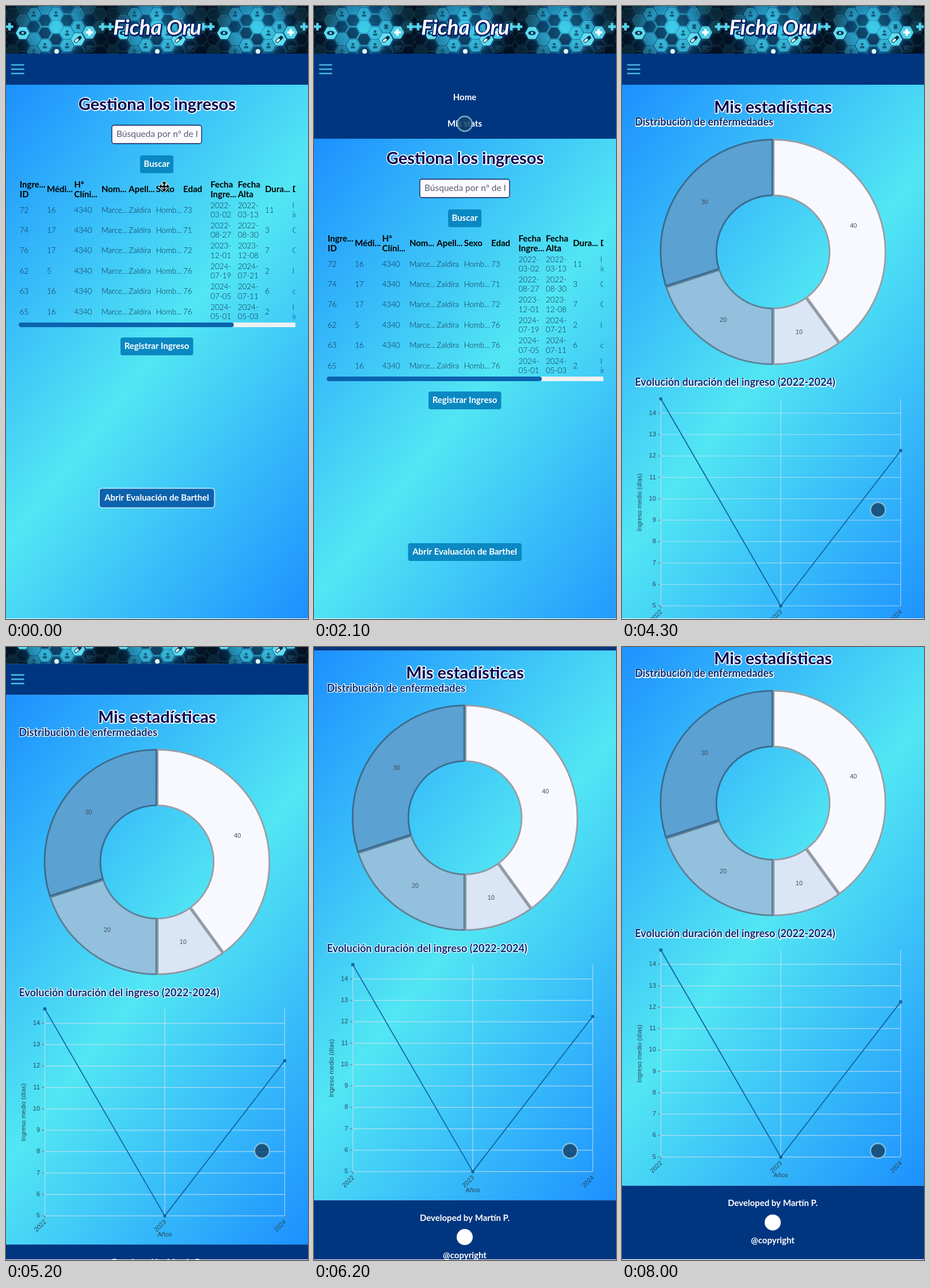
Recreate the animation shown at these times as an HTML page with a canvas. Size 525 by 1067 pixels, loop 8100 ms.

```html
<!DOCTYPE html>
<html lang="es">
<head>
<meta charset="utf-8">
<title>Panel de ingresos</title>
<style>
  html, body { margin: 0; width: 100%; height: 100%; overflow: hidden; background: #fff; }
  canvas { display: block; width: 525px; height: 1067px; }
</style>
</head>
<body>
<canvas id="stage" width="525" height="1067"></canvas>
<script>
const W = 525, H = 1067, LOOP = 8100, STEP = 100;
const ctx = document.getElementById('stage').getContext('2d');
const SANS = 'Lato, "Open Sans", sans-serif';
const CHART = '"Liberation Sans", Arial, sans-serif';
const NAVY = '#003680', BUTTON = '#0a88c2', ACTIVE = '#0b63ae';

// Times of the hard changes and of the scroll, in ms
const T = { touch: 200, menu: 1000, tapEnd: 1600, stats: 2300, charts: 3600, scroll: 4500, brake: 6300, rest: 6700 };

const lerp = (a, b, k) => a + (b - a) * k;
const clamp01 = v => Math.max(0, Math.min(1, v));
const smooth = k => k * k * (3 - 2 * k);

function text(str, x, y, size, o = {}) {
  ctx.font = `${o.style || ''} ${o.weight || 400} ${size}px ${o.family || SANS}`;
  ctx.textAlign = o.align || 'left';
  ctx.textBaseline = 'middle';
  if (o.halo) {
    ctx.lineJoin = 'round';
    ctx.lineWidth = o.haloWidth || 3;
    ctx.strokeStyle = o.halo;
    ctx.strokeText(str, x + 0.5, y + 0.5);
  }
  ctx.fillStyle = o.color || '#000';
  ctx.fillText(str, x, y);
}

const label = (str, x, y, color = '#fff') => text(str, x, y, 15, { weight: 700, align: 'center', color });

function rect(x, y, w, h, color) {
  ctx.fillStyle = color;
  ctx.fillRect(x, y, w, h);
}

function box(x, y, w, h, r, fill, stroke, line = 1.3) {
  ctx.beginPath();
  ctx.roundRect(x, y, w, h, r);
  ctx.fillStyle = fill;
  ctx.fill();
  if (stroke) {
    ctx.lineWidth = line;
    ctx.strokeStyle = stroke;
    ctx.stroke();
  }
}

function disc(c, x, y, r, color) {
  c.beginPath();
  c.arc(x, y, r, 0, Math.PI * 2);
  c.fillStyle = color;
  c.fill();
}

function line(x1, y1, x2, y2) {
  ctx.beginPath();
  ctx.moveTo(x1, y1);
  ctx.lineTo(x2, y2);
  ctx.stroke();
}

// Diagonal three-stop background, laid out like a CSS angle gradient
function backdrop(top, h) {
  const a = 128 * Math.PI / 180, s = Math.sin(a), c = -Math.cos(a);
  const half = (W * s + h * c) / 2, cx = W / 2, cy = top + h / 2;
  const g = ctx.createLinearGradient(cx - s * half, cy - c * half, cx + s * half, cy + c * half);
  g.addColorStop(0, '#1c90ff');
  g.addColorStop(0.5, '#52e6f3');
  g.addColorStop(1, '#1c90ff');
  rect(0, top, W, h, g);
}

// ---- Header banner: a repeated tile of glowing hexagons ----
function hexPath(c, x, y, r) {
  c.beginPath();
  for (let i = 0; i < 6; i++) c.lineTo(x + r * Math.cos(i * Math.PI / 3), y + r * Math.sin(i * Math.PI / 3));
  c.closePath();
}

function plus(c, x, y, r, color) {
  c.fillStyle = color;
  c.fillRect(x - r, y - r * 0.35, 2 * r, r * 0.7);
  c.fillRect(x - r * 0.35, y - r, r * 0.7, 2 * r);
}

function makeTile() {
  const tile = document.createElement('canvas');
  tile.width = 175;
  tile.height = 83;
  const c = tile.getContext('2d');
  c.fillStyle = '#03101f';
  c.fillRect(0, 0, 175, 83);
  const glow = c.createRadialGradient(87, 40, 4, 87, 40, 85);
  glow.addColorStop(0, '#2cb4da');
  glow.addColorStop(0.5, '#0d5a8c');
  glow.addColorStop(1, 'rgba(3,16,31,0)');
  c.fillStyle = glow;
  c.fillRect(0, 0, 175, 83);
  let seed = 11;
  const rnd = () => (seed = seed * 16807 % 2147483647) / 2147483647;
  for (let col = -1; col < 8; col++) {
    for (let row = -1; row < 4; row++) {
      const x = 29 + col * 19.3, y = (col & 1 ? 14 : 3) + row * 22;
      const near = clamp01(1.15 - Math.hypot(x - 87, (y - 45) * 1.2) / 85);
      const k = rnd();
      hexPath(c, x, y, 11.5);
      c.fillStyle = k > 0.35 ? `rgba(70,215,238,${near * (0.45 + k * 0.5)})` : `rgba(4,30,60,${0.7 * near})`;
      c.fill();
      c.strokeStyle = `rgba(80,205,235,${0.15 + near * 0.5})`;
      c.lineWidth = 0.9;
      c.stroke();
      if (k > 0.55 && near > 0.3) {
        c.fillStyle = 'rgba(8,60,95,.75)';
        if (k > 0.8) c.fillRect(x - 3, y - 4, 6, 8);
        else { disc(c, x, y - 2.5, 2.3, c.fillStyle); c.fillRect(x - 3.5, y + 1, 7, 3.5); }
      }
    }
  }
  const cell = (x, y, color) => { hexPath(c, x, y, 12); c.fillStyle = color; c.fill(); };
  cell(29, 47, '#5fdcf0');
  c.beginPath();
  c.ellipse(29, 47, 6.5, 3.8, 0, 0, Math.PI * 2);
  c.fillStyle = '#0a3656';
  c.fill();
  disc(c, 29, 47, 2, '#7fe6f5');
  cell(145, 46, '#4dcfe8');
  plus(c, 145, 46, 6, '#f2feff');
  cell(125, 58, '#63def0');
  c.lineCap = 'round';
  c.lineWidth = 6;
  c.strokeStyle = '#0a2c48';
  c.beginPath();
  c.moveTo(121.5, 61);
  c.lineTo(128.5, 55);
  c.stroke();
  c.lineWidth = 4;
  c.strokeStyle = '#d8f8fc';
  c.beginPath();
  c.moveTo(121.5, 61);
  c.lineTo(124.5, 58.5);
  c.stroke();
  plus(c, 6, 36, 6.5, '#54d4ee');
  plus(c, 168, 36, 6.5, '#54d4ee');
  disc(c, 88, 79, 4, '#e0fbff');
  c.lineWidth = 1.6;
  c.strokeStyle = '#2a8fc0';
  c.beginPath();
  c.arc(125, 5, 4, 0, Math.PI * 2);
  c.stroke();
  c.fillStyle = 'rgba(120,190,215,.45)';
  for (let i = 0; i < 4; i++) {
    c.fillRect(111, 68 + i * 3, 6 + rnd() * 7, 0.8);
    c.fillRect(140, 69 + i * 2, 5 + rnd() * 8, 0.7);
  }
  return tile;
}
const tile = makeTile();

function header(tapped) {
  for (let i = 0; i < 3; i++) ctx.drawImage(tile, i * 175, 0);
  text('Ficha Oru', 263, 39, 37, { weight: 700, style: 'italic', align: 'center', color: '#fff', halo: '#06206a', haloWidth: 4 });
  rect(0, 83, W, 54, tapped ? '#1062a6' : NAVY);
  ctx.lineCap = 'round';
  ctx.lineWidth = 2.7;
  ctx.strokeStyle = tapped ? '#2fa5cd' : '#48b6dc';
  for (const y of [102.5, 110, 117.5]) line(10, y, 30.5, y);
  ctx.lineCap = 'butt';
}

const title = (str, y) => text(str, 262.5, y, 29, { weight: 700, align: 'center', color: '#0a0850', halo: '#f4f8ff', haloWidth: 3.5 });

// ---- Admissions page ----
const COL = 47.4;
const heads = [['Ingre...', 'ID'], 'Médi...', ['Hª', 'Clíni...'], 'Nom...', 'Apell...', 'Sexo', 'Edad',
  ['Fecha', 'Ingre...'], ['Fecha', 'Alta'], 'Dura...', 'D'];
const rows = [
  '72 16 Zaldira 73 2022-03-02 2022-03-13 11 l/in',
  '74 17 Zaldíra 71 2022-08-27 2022-08-30 3 C',
  '76 17 Zaldíra 72 2023-12-01 2023-12-08 7 C',
  '62 5 Zaldíra 76 2024-07-19 2024-07-21 2 l',
  '63 16 Zaldíra 76 2024-07-05 2024-07-11 6 c',
  '65 16 Zaldíra 76 2024-05-01 2024-05-03 2 l/in'
].map(r => {
  const [id, doc, surname, age, from, to, days, note] = r.split(' ');
  const day = d => [d.slice(0, 5), d.slice(5)];
  return [id, doc, '4340', 'Marce...', surname, 'Homb...', age, day(from), day(to), days, note.includes('/') ? note.split('/') : note];
});

function cells(list, y, size, o) {
  list.forEach((v, i) => {
    const x = 23.7 + i * COL;
    if (Array.isArray(v)) v.forEach((s, k) => text(s, x, y - 8 + k * 16.5, size, o));
    else text(v, x, y, size, o);
  });
}

function admissions(menuOpen) {
  const top = menuOpen ? 231 : 137;
  backdrop(top, 930);
  if (menuOpen) {
    rect(0, 137, W, 94, NAVY);
    label('Home', 262, 159);
    label('Mis stats', 262, 205);
  }
  ctx.save();
  ctx.translate(0, top - 137);
  title('Gestiona los ingresos', 172);

  box(184, 207.5, 156, 32, 4, '#fbfaff', '#101858');
  ctx.save();
  ctx.beginPath();
  ctx.rect(190, 208, 143, 31);
  ctx.clip();
  text('Búsqueda por nº de historia', 192, 223, 15.5, { color: '#5c5c76' });
  ctx.restore();

  box(233, 260, 58, 31, 4, BUTTON);
  label('Buscar', 262, 275.5);

  ctx.save();
  ctx.beginPath();
  ctx.rect(22, 300, 481, 262);
  ctx.clip();
  cells(heads, 319.5, 15, { weight: 700 });
  rows.forEach((r, i) => cells(r, 355.5 + i * 35.4, 13.4, { weight: 300, color: '#0c2a48' }));
  box(22, 551, 500, 8, 4, '#eff0f2');
  box(22, 551, 374, 8, 4, ACTIVE);
  ctx.restore();

  box(199, 577, 126.5, 31, 4, BUTTON);
  label('Registrar Ingreso', 262, 592);
  if (menuOpen) box(163.5, 841, 197.5, 31, 4, BUTTON);
  else box(162, 839.5, 200.5, 34, 5, ACTIVE, '#cfeefa', 1.5);
  label('Abrir Evaluación de Barthel', 262, 856);
  ctx.restore();
}

// ---- Statistics page ----
function footer(top) {
  rect(0, top, W, 128, NAVY);
  label('Developed by Martín P.', 262, top + 31);
  disc(ctx, 262, top + 64, 14, '#fff');
  label('@copyright', 262, top + 96);
}

// Double helix of dots; the strand nearer the viewer is larger and drawn last
function loader(t) {
  const dots = [];
  for (let i = 0; i < 10; i++) {
    const a = i * Math.PI / 5 + (t - 2900) / 2000 * Math.PI * 2;
    for (const side of [1, -1]) dots.push({ x: 203 + i * 13.2, y: 262.5 + side * 26.5 * Math.sin(a), z: side * Math.cos(a), red: side > 0 });
  }
  dots.sort((p, q) => p.z - q.z);
  for (const d of dots) {
    const k = (d.z + 1) / 2;
    const color = d.red
      ? `rgb(${lerp(165, 250, k)},${lerp(70, 45, k)},${lerp(130, 70, k)})`
      : `rgb(${lerp(40, 85, k)},${lerp(140, 212, k)},${lerp(178, 226, k)})`;
    disc(ctx, d.x, d.y, 4.3 + 1.1 * d.z, color);
  }
}

const slices = [
  [40, '#f7f9ff', '#9b9da5'],
  [10, '#dae6f5', '#8f99a5'],
  [20, '#93c0dc', '#5d7f95'],
  [30, '#5ba1d1', '#3b6b8e']
];

function donut(cx, cy) {
  const outer = 195.5, inner = 98.5, pad = 0.0065;
  let sum = 0;
  for (const [value, fill, edge] of slices) {
    const a = sum / 50 * Math.PI - Math.PI / 2;
    sum += value;
    const b = sum / 50 * Math.PI - Math.PI / 2, mid = (a + b) / 2;
    ctx.beginPath();
    ctx.arc(cx, cy, outer, a + pad, b - pad);
    ctx.arc(cx, cy, inner, b - pad * 2, a + pad * 2, true);
    ctx.closePath();
    ctx.fillStyle = fill;
    ctx.fill();
    ctx.lineJoin = 'round';
    ctx.lineWidth = 2.8;
    ctx.strokeStyle = edge;
    ctx.stroke();
    text(value, cx + 147 * Math.cos(mid), cy + 147 * Math.sin(mid), 11, { family: CHART, align: 'center', color: '#42505e' });
  }
}

function lineChart() {
  const left = 67.5, right = 484.5, top = 684, base = 1044, unit = 37.25;
  const o = { family: CHART, color: '#28465a' };
  const xs = [left, (left + right) / 2, right];
  ctx.lineWidth = 1.2;
  for (let v = 5; v <= 14; v++) {
    const y = base - (v - 5) * unit;
    ctx.strokeStyle = 'rgba(215,228,238,.72)';
    line(left, y, right, y);
    ctx.strokeStyle = '#6b7f8c';
    line(left - 5, y, left, y);
    text(v, left - 8.5, y, 11, { ...o, align: 'right' });
  }
  xs.forEach((x, i) => {
    ctx.strokeStyle = 'rgba(215,228,238,.72)';
    line(x, top, x, base);
    ctx.strokeStyle = '#6b7f8c';
    line(x, base, x, base + 5);
    ctx.save();
    ctx.translate(x + 1, base + 9);
    ctx.rotate(-Math.PI / 4);
    text(2022 + i, 0, 0, 11, { ...o, align: 'right' });
    ctx.restore();
  });
  ctx.save();
  ctx.translate(31, 864);
  ctx.rotate(-Math.PI / 2);
  text('Ingreso medio (días)', 0, 0, 11, { ...o, align: 'center' });
  ctx.restore();
  text('Años', 276, 1076.5, 11, { ...o, align: 'center' });

  const points = [14.67, 5, 12.25].map((v, i) => [xs[i], base - (v - 5) * unit]);
  ctx.beginPath();
  points.forEach(p => ctx.lineTo(...p));
  ctx.lineWidth = 1.8;
  ctx.strokeStyle = '#1463a3';
  ctx.stroke();
  points.forEach(([x, y]) => disc(ctx, x, y, 2.9, '#1463a3'));
}

function stats(t) {
  const loaded = t >= T.charts, end = loaded ? 1094 : 959;
  backdrop(137, end - 137);
  title('Mis estadísticas', 177);
  if (loaded) {
    const o = { weight: 700, color: '#0d2c72', halo: '#e4f5ff', haloWidth: 2.6 };
    text('Distribución de enfermedades', 22.5, 203, 18, o);
    donut(262.5, 428);
    text('Evolución duración del ingreso (2022-2024)', 22.5, 656, 18, o);
    lineChart();
  } else loader(t);
  footer(end);
}

function scrollAt(t) {
  const speed = 0.077, full = 156.3;
  if (t < T.brake) return Math.max(0, t - T.scroll) * speed;
  const k = 1 - clamp01((t - T.brake) / (T.rest - T.brake));
  return full - (full - (T.brake - T.scroll) * speed) * k * k;
}

// ---- Pointer ----
const path = [[0, 275, 314], [200, 255, 300], [800, 18, 107], [1400, 18, 107], [2000, 262, 205], [2300, 262, 205],
  [2900, 422, 754], [3400, 445, 877], [LOOP, 445, 877]];

function pointer(t) {
  const i = path.findIndex(p => p[0] > t);
  const [t0, x0, y0] = path[i - 1], [t1, x1, y1] = path[i];
  const k = smooth((t - t0) / (t1 - t0));
  const x = lerp(x0, x1, k), y = lerp(y0, y1, k);
  if (t < T.touch) return moveCursor(x, y);
  disc(ctx, x, y, 13, 'rgba(20,66,104,.82)');
  ctx.lineWidth = 2.4;
  ctx.strokeStyle = 'rgba(150,205,222,.8)';
  ctx.stroke();
}

function moveCursor(x, y) {
  ctx.save();
  ctx.translate(x, y);
  ctx.beginPath();
  for (let i = 0; i < 4; i++) {
    ctx.rotate(Math.PI / 2);
    for (const [px, py] of [[1, -1], [1, -5], [4, -5], [0, -9], [-4, -5], [-1, -5], [-1, -1]]) ctx.lineTo(px, py);
  }
  ctx.closePath();
  ctx.lineJoin = 'round';
  ctx.lineWidth = 2;
  ctx.strokeStyle = 'rgba(255,255,255,.8)';
  ctx.stroke();
  ctx.fillStyle = '#000';
  ctx.fill();
  ctx.restore();
}

function draw(t) {
  rect(0, 0, W, H, '#fff');
  ctx.save();
  ctx.beginPath();
  ctx.rect(0, 0, W, 1066);
  ctx.clip();
  ctx.save();
  ctx.translate(0, -scrollAt(t));
  if (t < T.stats) admissions(t >= T.menu);
  else stats(t);
  header(t >= T.menu && t < T.tapEnd);
  ctx.restore();
  pointer(t);
  ctx.restore();
}

function tick() {
  const t = performance.now() % LOOP;
  draw(Math.floor(t / STEP) * STEP);
  requestAnimationFrame(tick);
}
tick();
</script>
</body>
</html>
```
